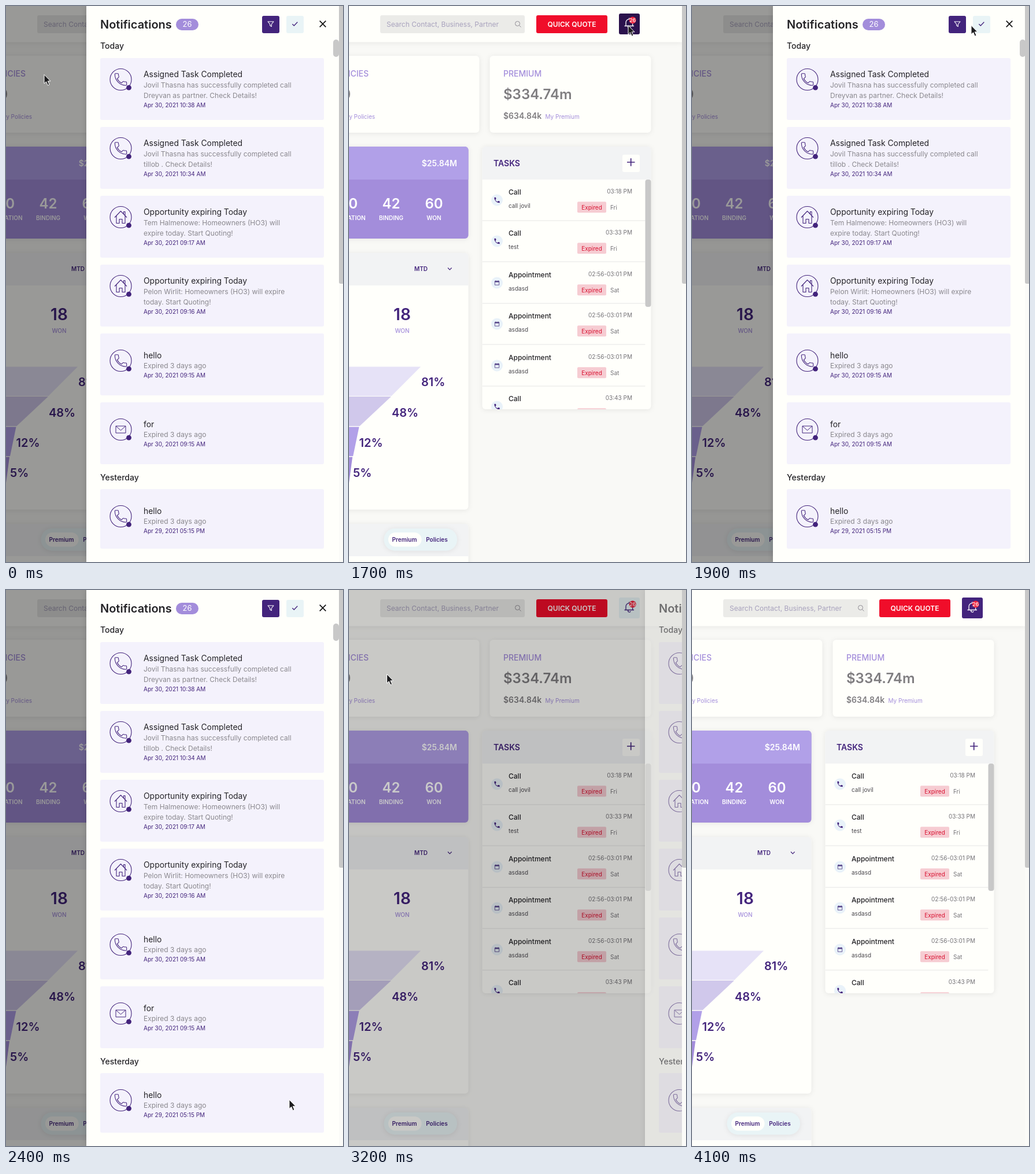
An HTML page for the animation above (4400 ms loop, 583 by 961 pixels).

```html
<!DOCTYPE html>
<html lang="en">
<head>
<meta charset="utf-8">
<title>Notification drawer</title>
<style>
  html, body { margin: 0; width: 100%; height: 100%; overflow: hidden; background: #f9f9f6; }
  svg { display: block; width: 583px; height: 961px; font-family: Inter, "Liberation Sans", sans-serif; font-optical-sizing: none; }
  .card { filter: drop-shadow(0 1px 4px rgba(0, 0, 0, .08)); }
  .sheet { filter: drop-shadow(0 0 5px rgba(0, 0, 0, .16)); }
</style>
</head>
<body>
<svg id="stage" viewBox="0 0 583 961" xmlns="http://www.w3.org/2000/svg"></svg>
<script>
const INK = '#43247c', LILAC = '#a38ddb', LIGHT = '#b1a0e8', PAPER = '#fffffb',
      HEAD = '#f2f3f4', MIST = '#e9f4f6', GREY = '#7f7d80', THUMB = '#c8c8c8';

const text = (x, y, s, size, weight, fill, anchor = 'start') =>
  `<text x="${x}" y="${y}" font-size="${size}" font-weight="${weight}" fill="${fill}" text-anchor="${anchor}">${s}</text>`;
const rect = (x, y, w, h, fill, r = 0, more = '') =>
  `<rect x="${x}" y="${y}" width="${w}" height="${h}" rx="${r}" fill="${fill}" ${more}/>`;
const circle = (x, y, r, fill, more = '') => `<circle cx="${x}" cy="${y}" r="${r}" fill="${fill}" ${more}/>`;
const path = (d, fill, more = '') => `<path d="${d}" fill="${fill}" ${more}/>`;
const line = (d, color, w, more = '') => path(d, 'none', `stroke="${color}" stroke-width="${w}" ${more}`);
const at = (x, y, s) => `<g transform="translate(${x} ${y})">${s}</g>`;

const PHONE = 'M-5.4-1.2c1.4 2.8 3.8 5.1 6.6 6.6l2.2-2.2c.3-.3.7-.4 1-.2 1.1.4 2.3.6 3.6.6.6 0 1 .4 1 1V8' +
  'c0 .6-.4 1-1 1C-1.4 9-9 1.4-9-8c0-.6.5-1 1-1h3.5c.6 0 1 .4 1 1 0 1.3.2 2.5.6 3.6.1.3 0 .7-.2 1z';

function header() {
  return `<g class="card">${rect(-10, -10, 586, 72.5, PAPER)}</g>` +
    rect(54, 16, 250, 31, '#ebebe8', 3) +
    text(65, 36, 'Search Contact, Business, Partner', 12, 400, '#a8a2bd') +
    line('M294.5 33.5L297.5 36.5M295.5 30.5a4 4 0 1 1-8 0a4 4 0 1 1 8 0', '#8d8a92', 1) +
    rect(324, 16, 123, 31, '#f00d2a', 3) +
    text(385.5, 36, 'QUICK QUOTE', 12, 600, '#fff', 'middle') +
    rect(467, 13, 36, 36, INK, 3, 'id="bell"') +
    line('M477 34.5H492.5M479 34.5V28.5a5.8 5.8 0 0 1 11.6 0V34.5M483 35a2 2 0 0 0 4 2M484.8 22.5V21',
      '#fff', 1.3, 'id="bellIcon" stroke-linecap="round"') +
    circle(490.7, 24.6, 6, '#f0203a') + text(490.7, 28, '26', 9, 500, '#fff', 'middle');
}

function stats() {
  return `<g class="card">${rect(-20, 86, 245.5, 133, PAPER, 6)}${rect(243.5, 86, 279, 133, PAPER, 6)}</g>` +
    text(34, 122, 'POLICIES', 14, 500, LILAC, 'end') +
    text(3, 161, '0', 24, 600, GREY, 'end') +
    text(45, 195, 'My Policies', 10, 400, LILAC, 'end') +
    text(267, 122, 'PREMIUM', 14, 500, LILAC) +
    text(267, 161, '$334.74m', 24, 600, GREY) +
    text(267, 195, '$634.84k', 14, 600, GREY) +
    text(339.5, 195, 'My Premium', 10, 400, LILAC);
}

function pipeline() {
  const step = (y, h, a, b, fill) => path(`M0 ${y}H${a}L${b} ${y + h}H0Z`, fill);
  return `<g class="card">${rect(-20, 243, 226.5, 159, LILAC, 6)}</g>` +
    path('M0 243H200.5a6 6 0 0 1 6 6V300H0Z', LIGHT) +
    text(187, 277, '$25.84M', 14, 600, '#fff', 'end') +
    text(15, 350, '50', 24, 600, '#fff', 'end') +
    text(28.5, 370, 'QUOTATION', 10, 600, '#fff', 'end') +
    text(73, 350, '42', 24, 600, '#fff', 'middle') + text(73, 370, 'BINDING', 10, 600, '#fff', 'middle') +
    text(147, 350, '60', 24, 600, '#fff', 'middle') + text(147, 370, 'WON', 10, 600, '#fff', 'middle') +
    `<g class="card">${rect(-20, 427, 226.5, 443.5, PAPER, 6)}</g>` +
    path('M0 427H200.5a6 6 0 0 1 6 6V483H0Z', HEAD) +
    text(113, 458, 'MTD', 10, 600, INK) +
    line('M171 452.5L174.3 455.8L177.6 452.5', INK, 1.2) +
    text(92, 543, '18', 28, 600, INK, 'middle') + text(92, 565, 'WON', 10, 500, LILAC, 'middle') +
    step(623.5, 50.5, 124, 73.5, '#e6e2f7') + step(675, 51, 73, 18.5, '#d0c8eb') +
    step(727.5, 50.5, 17.5, 7, LIGHT) + step(779.5, 45, 6, 0, LILAC) +
    [['81%', 125, 657], ['48%', 74, 710], ['12%', 17.5, 762], ['5%', 7, 814]]
      .map(([s, x, y]) => text(x, y, s, 20, 600, INK)).join('') +
    `<g class="card">${rect(-20, 895, 226.5, 90, PAPER, 6)}</g>` +
    path('M0 895H200.5a6 6 0 0 1 6 6V951H0Z', HEAD) +
    `<g class="card">${rect(60.5, 903, 126.5, 38.5, MIST, 19)}</g>` +
    rect(68, 910, 57.5, 24.5, PAPER, 12) +
    text(96, 926, 'Premium', 10, 600, INK, 'middle') + text(152, 926, 'Policies', 10, 600, INK, 'middle');
}

function tasks() {
  const rows = [
    ['Call', 'call jovil', '03:18 PM', 'Fri'], ['Call', 'test', '03:33 PM', 'Fri'],
    ...Array(3).fill(['Appointment', 'asdasd', '02:56-03:01 PM', 'Sat']), ['Call', 'test', '03:43 PM', 'Sat']
  ];
  const row = ([title, note, time, day], i) => at(0, Math.round(300 + i * 71.4),
    circle(256, 35.5, 10, '#e9f2f9') +
    at(256, 35.5, title === 'Call' ? path(PHONE, INK, 'transform="scale(.52)"') :
      line('M-3.7-3H3.7V3.7H-3.7ZM-2-4.3V-2M2-4.3V-2', '#56458a', .9) + rect(-3.7, -3, 7.4, 2, '#56458a')) +
    text(276, 26, title, 12, 500, '#242327') + text(276, 49, note, 10, 400, '#48464c') +
    text(490, 24, time, 10, 400, '#747277', 'end') +
    rect(395, 38.3, 50, 19, '#f6ccd2', 2) + text(420, 52, 'Expired', 10, 400, '#d8102f', 'middle') +
    text(452, 52, day, 10, 400, '#747277') +
    rect(230.5, 70.5, 282, 1, '#e6e6e6'));
  return `<g class="card">${rect(230.5, 243, 292, 454, PAPER, 6)}</g>` +
    path('M230.5 300V249a6 6 0 0 1 6-6H516.5a6 6 0 0 1 6 6V300Z', HEAD) +
    text(250, 277, 'TASKS', 14, 600, INK) +
    rect(473, 257, 30, 30, PAPER, 3) + line('M481 270H494.5M487.7 263.3V276.7', INK, 1.7) +
    `<g clip-path="url(#list)">${rows.map(row).join('')}</g>` +
    rect(512.5, 300, 10, 220, THUMB, 4);
}

function notices() {
  const icons = {
    phone: path(PHONE, 'none', `stroke="${INK}" stroke-width=".95" transform="scale(1.13)"`),
    home: line('M-10.5 .5L0-10.5L10.5 .5M-7.5-2V10.5H-2.5V3.5H2.5V10.5H7.5V-2M5-5.5V-9.5H7.5V-3', INK, 1.1, 'stroke-linejoin="round"'),
    mail: line('M-8.5-6H8.5V6H-8.5ZM-8.5-6L0 1.5L8.5-6', INK, 1, 'stroke-linejoin="round"')
  };
  const done = 'Assigned Task Completed', due = 'Opportunity expiring Today', old = ['Expired 3 days ago'];
  const list = [
    ['phone', done, ['Jovil Thasna has successfully completed call', 'Dreyvan as partner. Check Details!'], '30, 2021 10:38 AM'],
    ['phone', done, ['Jovil Thasna has successfully completed call', 'tillob . Check Details!'], '30, 2021 10:34 AM'],
    ['home', due, ['Tem Halmenowe: Homeowners (HO3) will', 'expire today. Start Quoting!'], '30, 2021 09:17 AM'],
    ['home', due, ['Pelon Wirlit: Homeowners (HO3) will expire', 'today. Start Quoting!'], '30, 2021 09:16 AM'],
    ['phone', 'hello', old, '30, 2021 09:15 AM'],
    ['mail', 'for', old, '30, 2021 09:15 AM'],
    ['phone', 'hello', old, '29, 2021 05:15 PM']
  ];
  return list.map(([icon, title, body, date], i) => {
    const last = i === 6, short = body.length === 1, dy = short ? 10 : 0;
    return at(0, last ? 835 : 90 + i * 119,
      rect(163, 0, 387, last ? 103 : 107, '#f4f2fc', 3) +
      at(198.5, 37 + dy,
        circle(0, 0, 18.5, 'none', `stroke="${INK}" stroke-width="1.1"`) +
        icons[icon] + circle(14, 14.2, 4.4, INK)) +
      text(238, 33 + dy, title, 13.9, 400, '#242327') +
      body.map((s, k) => text(238, (short ? 60 : 51) + k * 18, s, 12, 400, '#8a888e')).join('') +
      text(238, short ? 76 : 85, 'Apr ' + date, 10, 400, INK));
  }).join('');
}

function drawer() {
  return rect(139, 0, 437, 961, PAPER, 0, 'class="sheet"') +
    text(163, 39, 'Notifications', 20, 600, '#242327') +
    rect(294, 22, 39, 20, LILAC, 10) + text(313.5, 36, '26', 13, 400, '#fff', 'middle') +
    rect(443, 17, 30, 30, INK, 3, 'id="filter"') +
    line('M453 27H463L459.3 31.5V35.5L456.7 33.8V31.5Z', '#fff', 1.1, 'id="filterIcon" stroke-linejoin="round"') +
    rect(485, 17, 30, 30, MIST, 3) + line('M495.3 31.2L498.3 34L504.3 27.8', INK, 1.3) +
    line('M542.7 25.7L553.3 36.3M553.3 25.7L542.7 36.3', '#141414', 1.7) +
    text(163, 74, 'Today', 14, 500, '#242327') +
    text(163, 820, 'Yesterday', 14, 500, '#242327') +
    notices() + rect(566, 58, 10, 30, THUMB, 5);
}

const $ = id => document.getElementById(id);
$('stage').innerHTML =
  `<defs><clipPath id="view">${rect(0, 0, 576, 961, '#000')}</clipPath>` +
  `<clipPath id="list">${rect(230.5, 300, 292, 397, '#000', 5)}</clipPath></defs>` +
  rect(0, 0, 583, 961, '#f9f9f6') + header() + stats() + pipeline() + tasks() +
  rect(0, 0, 576, 961, '#000', 0, 'id="shade"') +
  `<g clip-path="url(#view)"><g id="drawer">${drawer()}</g></g>` +
  rect(576, 0, 7, 961, '#fbfbf8') + path('M576 0H583V480H579a3 3 0 0 1-3-3Z', THUMB) +
  path('M0 0V15.6L3.6 12.3L6.3 18.6L9 17.4L6.3 11.3H11Z', '#1c1c1e',
    'id="cursor" stroke="#fff" stroke-width="1" stroke-linejoin="round"');

// Every track is [time, ...values]; values hold until the next entry.
const DRAWER = [ // slide, opacity, shade
  [0, 0, 1, .4], [300, 437, 0, 0], [1800, 70, .85, .34], [1900, 1, 1, .4], [2000, 0, 1, .4],
  [3200, 373, .54, .21], [3300, 437, 0, 0]
];
const BELL = [
  [0, MIST, INK], [500, INK, '#fff'], [1600, '#361a64', '#fff'], [1700, '#2b124c', '#fff'],
  [1800, MIST, INK], [3400, INK, '#fff']
];
const FILTER = [[0, INK, '#fff'], [100, MIST, INK], [300, INK, '#fff'], [3000, MIST, INK]];
const POINTER = [
  [0, 66, 118.5], [800, 187, 109.5], [1000, 222, 104], [1100, 335, 75], [1200, 440, 45], [1300, 483, 33.5],
  [2200, 505, 180], [2300, 515, 560], [2400, 490, 881], [2500, 310, 620], [2600, 150, 270], [2700, 73, 143.5],
  [2800, 65.5, 145.5], [3600, 65, 139], [3700, 65, 122], [3800, 64.5, 98], [3900, 64.5, 70], [4000, 65, 48],
  [4100, -50, 0]
];
const hold = (track, t) => track.filter(k => k[0] <= t).pop().slice(1);

function render(t) {
  const [slide, opacity, shade] = hold(DRAWER, t);
  $('drawer').setAttribute('transform', `translate(${slide} 0)`);
  $('drawer').setAttribute('opacity', opacity);
  $('shade').setAttribute('opacity', shade);
  for (const [id, track] of [['bell', BELL], ['filter', FILTER]]) {
    const [fill, stroke] = hold(track, t);
    $(id).setAttribute('fill', fill);
    $(id + 'Icon').setAttribute('stroke', stroke);
  }
  $('cursor').setAttribute('transform', `translate(${hold(POINTER, t).join(' ')})`);
}

const start = performance.now();
function tick() {
  render((performance.now() - start) % 4400);
  requestAnimationFrame(tick);
}
tick();
</script>
</body>
</html>
```
